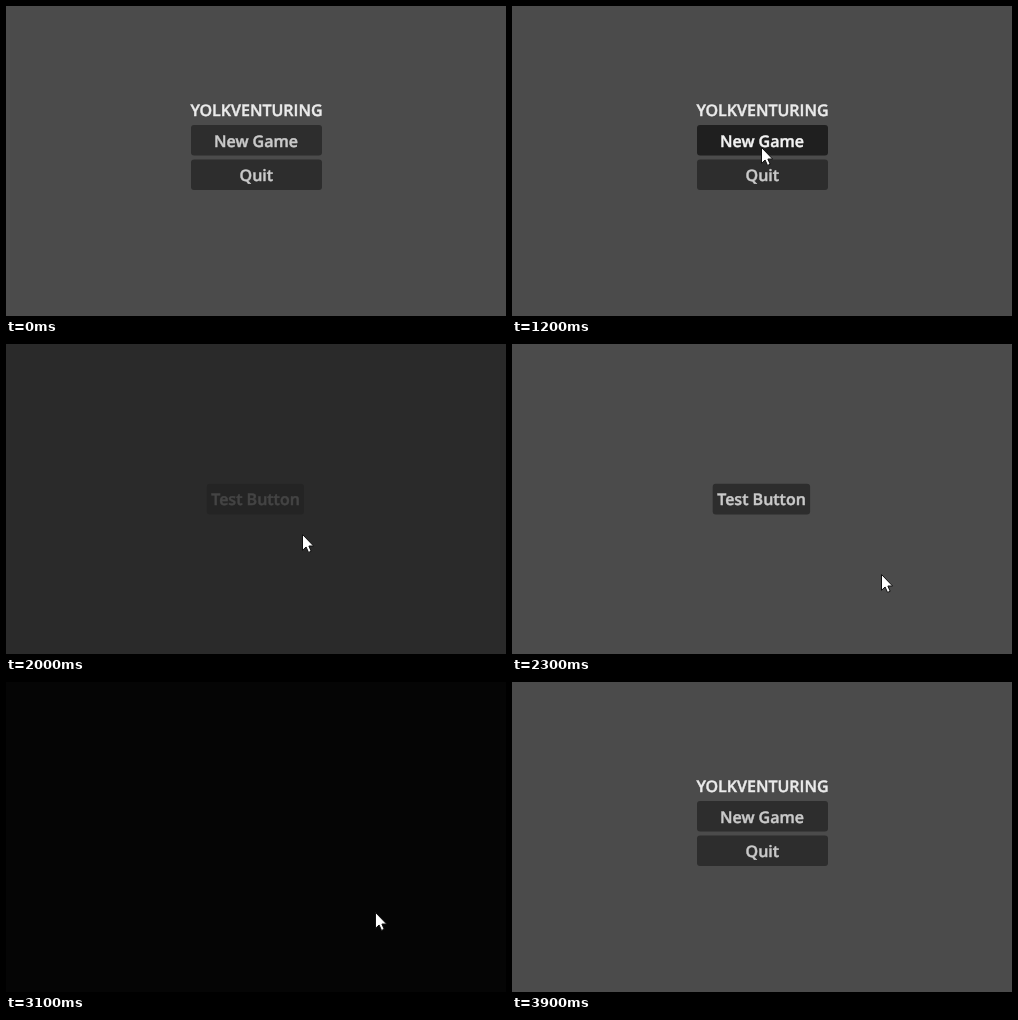
An HTML page for the animation above (4.8 s loop, 500x310 px).

```html
<!DOCTYPE html>
<html lang="en">
<head>
<meta charset="utf-8">
<title>Game menu</title>
<style>
  html, body { margin: 0; width: 100%; height: 100%; overflow: hidden; background: #000; }
  svg { display: block; width: 500px; height: 310px; }
  text {
    font: 600 16px "Open Sans", "Noto Sans", sans-serif;
    text-anchor: middle;
    text-rendering: geometricPrecision;
    fill: currentColor;
    stroke: currentColor;
    stroke-width: .45px;
    color: #ebebeb;
  }
  .button rect { fill: #2d2d2d; }
  .button text { color: #cacaca; }
  .hover rect { fill: #414141; }
  .hover text { color: #dedede; }
  .pressed rect { fill: #1f1f1f; }
  .pressed text { color: #f4f4f4; }
</style>
</head>
<body>
<svg viewBox="0 0 500 310">
  <rect id="back" width="500" height="310" fill="#4b4b4b"/>
  <g id="menu">
    <text x="250.5" y="109.5">YOLKVENTURING</text>
    <g id="start" class="button">
      <rect x="185" y="119" width="131" height="30.6" rx="3"/>
      <text x="250" y="140.5">New Game</text>
    </g>
    <g id="quit" class="button">
      <rect x="185" y="153.5" width="131" height="30.6" rx="3"/>
      <text x="250.3" y="175.4">Quit</text>
    </g>
  </g>
  <g id="level">
    <g id="test" class="button">
      <rect x="200.7" y="139.8" width="97.4" height="30.6" rx="3"/>
      <text x="249.5" y="161.4">Test Button</text>
    </g>
  </g>
  <rect id="shade" width="500" height="310"/>
  <path id="cursor" d="M.5 .5V16.3L4.1 13 6.5 18.4 9.2 17.3 6.9 12H11.6Z" fill="#fff" stroke="#111" stroke-width="1"/>
</svg>
<script>
  const LOOP = 4800, TICK = 100;
  const el = id => document.getElementById(id);
  const [menu, level, start, quit, test, shade, cursor] =
    ["menu", "level", "start", "quit", "test", "shade", "cursor"].map(el);

  // Brightness per tick while a scene fades out; fading in runs it backwards.
  const fade = [0.95, 0.8, 0.56, 0.313, 0.066];
  const fadeOut = [13, 27], fadeIn = [18, 32];

  // Pointer stops: tick, x, y. It rests between them.
  const stops = [
    [10, 249, 141], [13, 249, 148], [14, 249, 155], [15, 249, 159],
    [18, 251, 161], [19, 262, 169], [20, 296, 190], [21, 342, 217],
    [22, 372, 237], [23, 369, 230], [36, 373, 233], [37, 381, 239], [38, 388, 244]
  ];

  function brightness(tick) {
    for (const from of fadeOut) {
      if (tick >= from && tick < from + 5) return fade[tick - from];
    }
    for (const from of fadeIn) {
      if (tick >= from && tick < from + 5) return fade[4 - tick + from];
    }
    return 1;
  }

  function setState(button, state) {
    button.setAttribute("class", "button " + state);
  }

  function show(tick) {
    const light = brightness(tick);
    const inLevel = tick >= 18 && tick < 32;
    menu.style.display = inLevel ? "none" : "";
    level.style.display = inLevel ? "" : "none";

    // Labels vanish before the backdrop is fully dark.
    const content = Math.max(0, (light - 0.32) / 0.68);
    menu.style.opacity = level.style.opacity = content;
    shade.style.opacity = 1 - light;

    setState(quit, tick === 9 ? "hover" : "");
    setState(start, tick === 12 ? "pressed" : tick >= 10 && tick < 15 ? "hover" : "");
    setState(test, tick >= 18 && tick < 20 ? "hover" : "");

    const visible = tick >= 10 && tick < 39;
    cursor.style.display = visible ? "" : "none";
    if (visible) {
      const [, x, y] = stops.filter(s => s[0] <= tick).pop();
      cursor.setAttribute("transform", `translate(${x} ${y})`);
    }
  }

  const begin = performance.now();
  function frame(now) {
    const t = Math.max(0, now - begin) % LOOP;
    show(Math.floor(t / TICK));
    requestAnimationFrame(frame);
  }
  show(0);
  requestAnimationFrame(frame);
</script>
</body>
</html>
```
